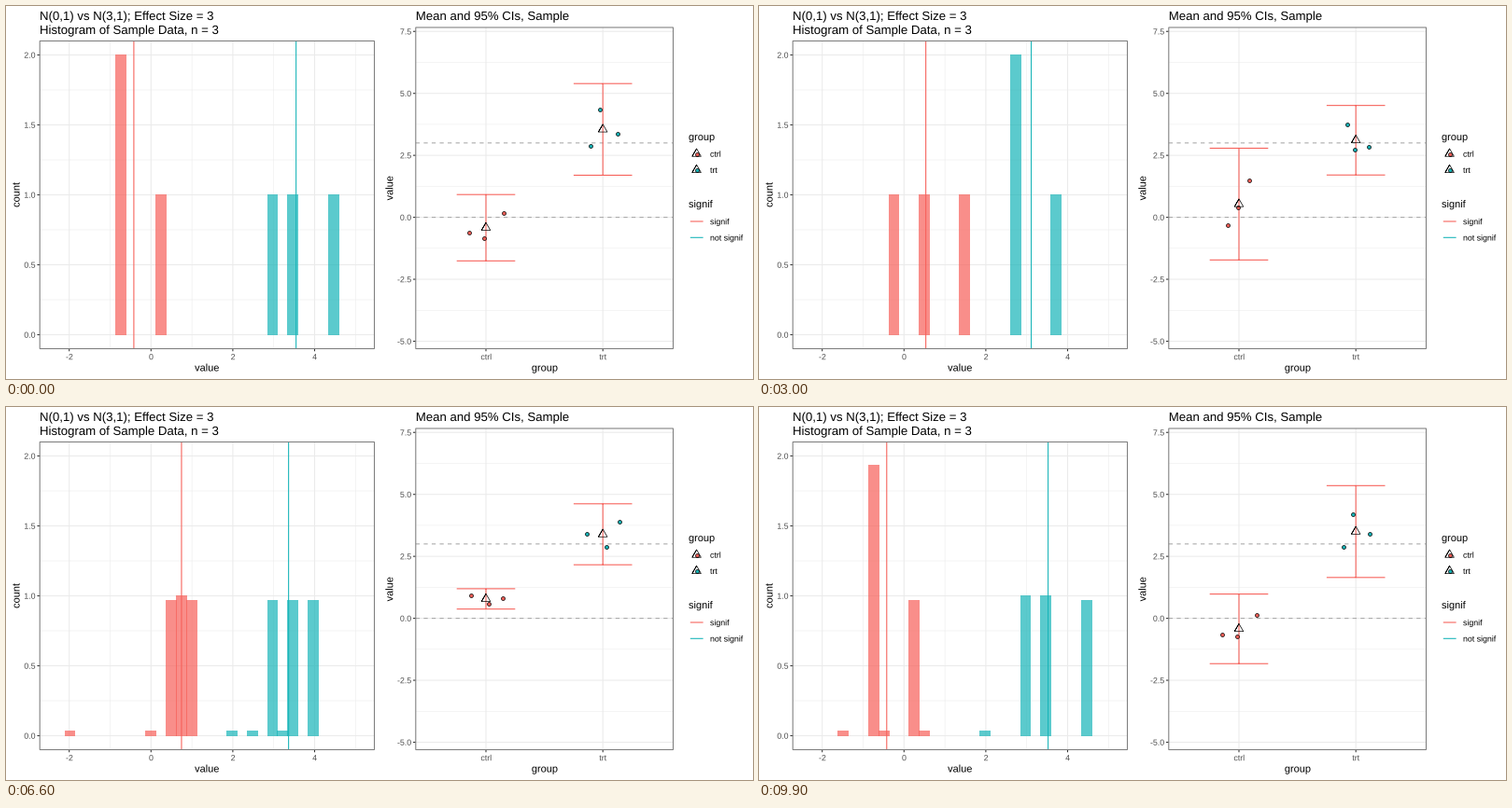
A matplotlib script that plays this animation: 800 px wide and 400 px high, repeating every 10000 ms.

```python
import numpy as np
import matplotlib.pyplot as plt
from matplotlib.animation import FuncAnimation
from matplotlib.patches import PathPatch, Rectangle
from matplotlib.textpath import TextPath
from matplotlib.transforms import Affine2D

plt.rcParams.update({
    "font.family": "Liberation Sans",
    "path.snap": False,
    "toolbar": "None",
})

W, H, DPI = 800, 400, 100
PT = 72 / DPI                      # points per pixel
RED, TEAL = COLORS = ("#F75F58", "#16B4B8")
GRID, TICK, BORDER, TICK_TEXT = "#EBEBEB", "#333333", "#7F7F7F", "#4D4D4D"
THICK, THIN, OUTLINE = 1.07 * PT, 0.53 * PT, 0.71 * PT

BINS, BIN_PX, BIN = 30, 10.85, 0.2477
T_2DF, T_4DF = 4.303, 2.776        # 97.5 % quantiles of t
CENTERS = (514.0, 639.2)           # x of ctrl and trt

# One sample per row: three ctrl then three trt values, left to right
SAMPLES = np.array([
    [-0.62, -0.83, 0.19, 2.90, 4.36, 3.38],
    [1.60, 0.34, -0.81, 2.95, 1.62, 2.59],
    [0.45, 0.55, 0.72, 4.20, 2.70, 2.95],
    [-0.30, 0.40, 1.50, 3.76, 2.74, 2.83],
    [-2.22, -0.62, 1.13, 2.31, 3.70, 3.56],
    [0.05, -0.05, 1.00, 2.25, 3.45, 3.70],
    [0.92, 0.60, 0.83, 3.40, 2.89, 3.88],
    [0.02, -1.95, 0.75, 2.50, 2.00, 3.20],
    [0.61, -0.22, 0.02, 2.62, 4.39, 4.99],
    [-1.45, 0.48, -0.55, 2.87, 2.00, 3.54],
]).reshape(-1, 2, 3)
N = len(SAMPLES)

rng = np.random.default_rng(3)
JITTER = 15 * np.arange(-1, 2) + 1 + rng.uniform(-5, 5, SAMPLES.shape)

MEANS = SAMPLES.mean(axis=2)
ERRS = SAMPLES.std(axis=2, ddof=1) / np.sqrt(3)
HALF = T_2DF * ERRS
SIGNIF = np.diff(MEANS)[:, 0] / np.hypot(*ERRS.T) > T_4DF

bin_of = np.rint(SAMPLES / BIN).astype(int) + 9
COUNTS = (bin_of[..., None] == np.arange(BINS)).sum(axis=2)


def hist_x(v):
    return 155.3 + 43.8 * v


def hist_y(c):
    return 352.5 - 150 * c


def ci_y(v):
    return 226.6 - 26.58 * v


def ease(t):
    return 4 * t ** 3 if t < 0.5 else 1 - 4 * (1 - t) ** 3


fig = plt.figure(figsize=(W / DPI, H / DPI), dpi=DPI, facecolor="white")
ax = fig.add_axes([0, 0, 1, 1])
ax.set_xlim(0, W)
ax.set_ylim(H, 0)
ax.axis("off")


def line(xs, ys, color, lw=THICK, z=1, **kw):
    return ax.plot(xs, ys, color=color, lw=lw, zorder=z,
                   solid_capstyle="butt", **kw)[0]


def text(x, y, s, size, color="black", align=0, turn=0):
    """Outline text on a baseline; align 0 is left, 0.5 centre, 1 right."""
    path = TextPath((0, 0), s, size=size)
    shift = -align * path.get_extents().x1
    place = Affine2D().translate(shift, 0).scale(1, -1)
    place.rotate_deg(-turn).translate(x, y)
    ax.add_patch(PathPatch(place.transform_path(path), fc=color, lw=0,
                           zorder=5))


def triangle(x, y):
    xs = [x - 4.77, x, x + 4.77, x - 4.77, x]
    ys = [y + 2.75, y - 5.5, y + 2.75, y + 2.75, y - 5.5]
    return xs, ys


def dots(xs, ys, color):
    return ax.scatter(xs, ys, s=(3.9 * PT) ** 2, fc=color, ec="black",
                      lw=OUTLINE, zorder=6)


def panel(x0, x1, y0, y1, xs, ys, minor_xs=(), minor_ys=()):
    """Grid, ticks and border; xs and ys pair positions with labels."""
    for x in minor_xs:
        line([x, x], [y0, y1], GRID, THIN, 0.5)
    for y in minor_ys:
        line([x0, x1], [y, y], GRID, THIN, 0.5)
    for x, label in xs:
        line([x, x], [y0, y1], GRID)
        line([x, x], [y1, y1 + 2.75], TICK)
        text(x, 379.2, label, 8.8, TICK_TEXT, 0.5)
    for y, label in ys:
        line([x0, x1], [y, y], GRID)
        line([x0 - 2.75, x0], [y, y], TICK)
        text(x0 - 5, y + 3.2, label, 8.8, TICK_TEXT, 1)
    ax.add_patch(Rectangle((x0, y0), x1 - x0, y1 - y0, fill=False,
                           ec=BORDER, lw=THICK, zorder=8))


# Static parts
panel(36.2, 394.5, 37.5, 367.5,
      [(hist_x(v), str(v)) for v in range(-2, 5, 2)],
      [(hist_y(c), f"{c:.1f}") for c in np.arange(0, 2.1, 0.5)],
      [hist_x(v) for v in range(-1, 6, 2)],
      [hist_y(c) for c in np.arange(0.25, 2, 0.5)])
panel(438.8, 714.5, 23, 367.5,
      list(zip(CENTERS, ("ctrl", "trt"))),
      [(ci_y(v), f"{v:.1f}") for v in np.arange(-5, 7.6, 2.5)],
      minor_ys=[ci_y(v) for v in np.arange(-3.75, 7, 2.5)])
for level in (0, 3):
    line([438.8, 714.5], [ci_y(level)] * 2, "#A9A9A9", z=2, dashes=(4, 4))

text(36, 15, "N(0,1) vs N(3,1); Effect Size = 3", 13.2)
text(36, 30, "Histogram of Sample Data, n = 3", 13.2)
text(438.8, 15, "Mean and 95% CIs, Sample", 13.2)
text(215, 391.5, "value", 11, align=0.5)
text(576.7, 391.5, "group", 11, align=0.5)
text(14.5, 202.5, "count", 11, align=0.5, turn=90)
text(414.3, 195.5, "value", 11, align=0.5, turn=90)

text(731, 144, "group", 11)
text(731, 216, "signif", 11)
for i, color in enumerate(COLORS):
    y = 158.5 + 17.3 * i
    dots([739.6], [y], color)
    line(*triangle(739.6, y), "black", OUTLINE, 7)
    text(754, y + 3.2, ("ctrl", "trt")[i], 8.8)
    y += 72.5
    line([732.8, 746.6], [y, y], color)
    text(754, y + 3.2, ("signif", "not signif")[i], 8.8)


class Group:
    """Moving parts of one group."""

    def __init__(self, g):
        self.cx, color = CENTERS[g], COLORS[g]
        lefts = hist_x(0) + (np.arange(BINS) - 9.5) * BIN_PX
        self.bars = [
            ax.add_patch(Rectangle((x, hist_y(0)), BIN_PX, 0, fc=color,
                                   alpha=0.7, lw=0, aa=False, zorder=3))
            for x in lefts]
        self.mean = line([0, 0], [37.5, 367.5], color, z=4)
        self.error = line([], [], RED, z=4)
        self.points = dots([], [], color)
        self.mark = line([], [], "black", OUTLINE, 7)

    def set_hist(self, counts, mean):
        for bar, c in zip(self.bars, counts):
            bar.set_height(-150 * c)
            bar.set_visible(c > 0)
        self.mean.set_xdata([hist_x(mean)] * 2)

    def set_ci(self, values, jitter, mean, half):
        a, c, b = self.cx + 31.3 * np.arange(-1, 2)
        top, low = ci_y(mean + half), ci_y(mean - half)
        self.error.set_data([a, b, np.nan, c, c, np.nan, a, b],
                            [top, top, np.nan, top, low, np.nan, low, low])
        self.points.set_offsets(np.column_stack([c + jitter, ci_y(values)]))
        self.mark.set_data(*triangle(c, ci_y(mean)))


groups = [Group(0), Group(1)]


def draw(frame):
    k, step = divmod(frame, 10)
    n = (k + 1) % N
    # The right-hand plot starts one step later than the histogram.
    p = ease(max(0, step - 5) / 5)
    q = ease(max(0, step - 6) / 4)

    def mix(w, *tables):
        return [t[k] + (t[n] - t[k]) * w for t in tables]

    hist = mix(p, COUNTS, MEANS)
    ci = mix(q, SAMPLES, JITTER, MEANS, HALF)
    for g, group in enumerate(groups):
        group.set_hist(*(part[g] for part in hist))
        group.set_ci(*(part[g] for part in ci))
        group.error.set_color(RED if SIGNIF[k] else TEAL)
        # Error bars that change class are absent in between.
        group.error.set_visible(q == 0 or SIGNIF[k] == SIGNIF[n])
    return []


anim = FuncAnimation(fig, draw, frames=100, interval=100, repeat=True,
                     repeat_delay=0, init_func=lambda: draw(0))
plt.show()
```
